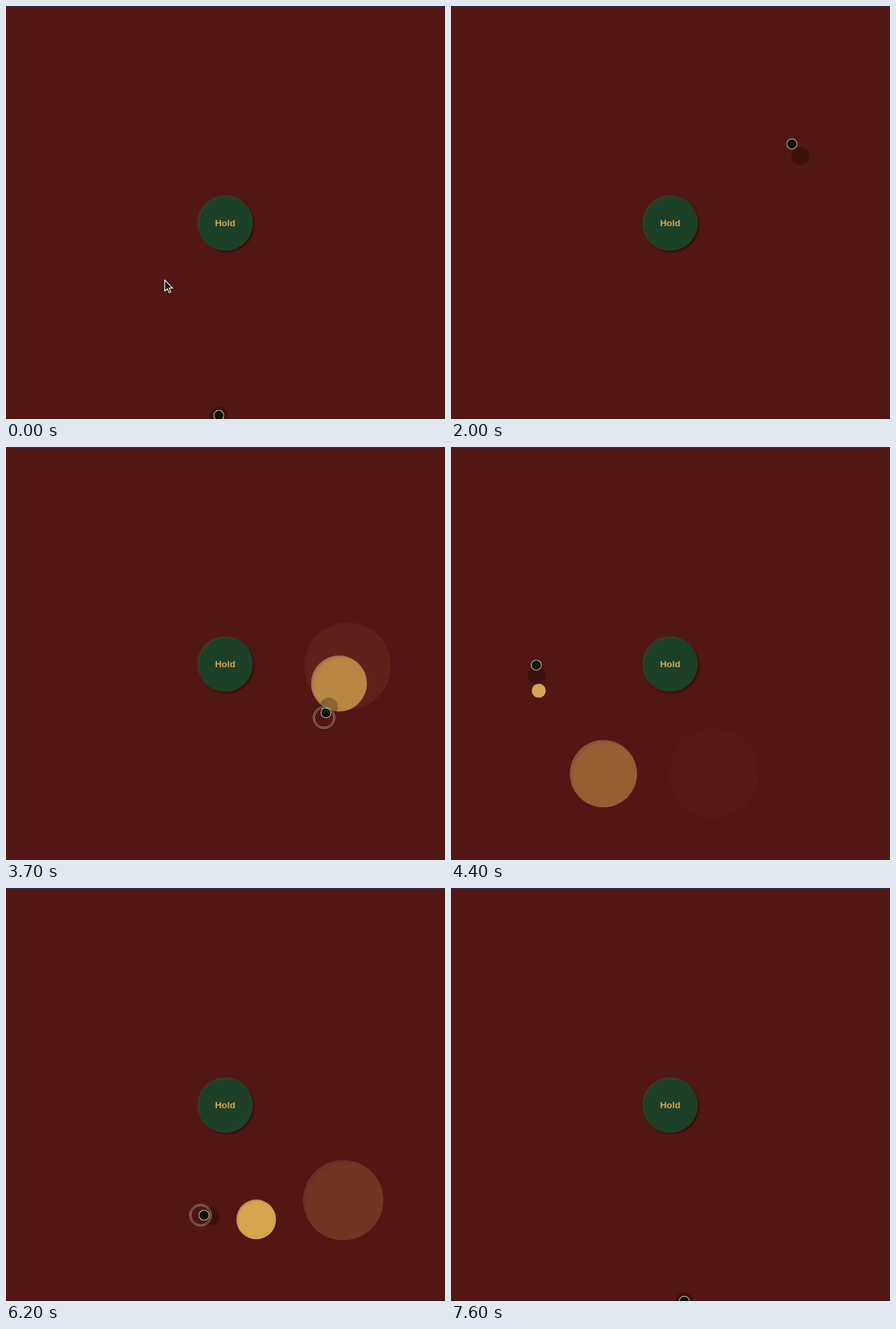
Animation, 640 px wide and 602 px high, one loop 9 s. Source, as an HTML page:

```html
<!DOCTYPE html>
<html lang="en">
<head>
<meta charset="utf-8">
<title>Hold</title>
<style>
html, body { margin: 0; width: 100%; height: 100%; overflow: hidden; background: #511715; }
#stage { position: relative; width: 640px; height: 602px; overflow: hidden; }
#stage > * { position: absolute; left: 0; top: 0; }
#bar { width: 640px; height: 2px; background: #30284a; }
#hold {
  left: 279px; top: 275.5px; width: 81px; height: 81px; border-radius: 50%;
  background: #1d4028; color: #d6a850; text-align: center;
  font: bold 13.33px/81px "Liberation Sans", Arial, sans-serif;
  box-shadow: 2px 2px 2px rgba(20, 22, 10, .7), inset 2px 2px 3px #553026;
}
.ripple {
  width: 132px; height: 132px; margin: -66px 0 0 -66px; border-radius: 50%;
  background: #d4a650; box-shadow: inset 4px 4px 4px rgba(180, 120, 135, .7);
}
#shade { width: 26px; height: 26px; margin: -13px 0 0 -13px; border-radius: 50%; background: rgba(0, 0, 0, .25); }
#dot {
  width: 13px; height: 13px; margin: -8px 0 0 -8px; padding: .5px; border-radius: 50%;
  border: 1px solid transparent;
  background: linear-gradient(#07110c, #07110c) content-box, linear-gradient(160deg, #d9a45c, #a9bd83) border-box;
  background-clip: content-box, border-box;
}
#dot { background: radial-gradient(circle, #07110c 6.4px, #c4a468 6.9px) border-box; }
#ring {
  width: 27px; height: 27px; margin: -16.5px 0 0 -16.5px; border-radius: 50%;
  border: 3px double #9a8c80;
}
</style>
</head>
<body>
<div id="stage">
  <div id="bar"></div>
  <div id="hold">Hold</div>
  <div id="shade"></div>
  <div id="dot"></div>
  <div id="ring"></div>
  <svg id="arrow" width="640" height="602">
    <path d="M231.5 399.5v16l3.7-3.4 2.5 5.6 2.5-1.1-2.5-5.4h4.9z" fill="#000" stroke="#fff" stroke-width="1.2"/>
  </svg>
</div>
<script>
const LOOP = 9000, STEP = 100;
const CENTRE = [320, 316];
const FIRST_CLICK = 2432, CLICK_GAP = 214, CLICKS = 21, LIFE = 520;
const LEAD = 16, LAG = 25;

// The follower circles the button: time, angle in degrees, distance
const keys = [
  [0, 92, 281], [250, 133, 122], [600, -12, 110], [720, -12, 110],
  [1180, -180, 95], [1480, -270, 255], [2000, -393, 211], [2415, -487, 197],
  [2626, -434, 168], [2900, -406, 201], [3268, -359, 178], [3700, -334, 163],
  [4330, -193, 196], [4980, -96, 188], [5200, -57, 198], [5836, 39, 221],
  [6050, 75, 173], [6200, 101, 164], [6440, 122, 221], [7400, 86, 287]
];
const last = keys.length - 1;
const el = id => document.getElementById(id);

// Flat at the ends and wherever the value holds or turns back
function slope(i, axis) {
  if (i === 0 || i === last) return 0;
  const [a, b, c] = keys.slice(i - 1, i + 2);
  if ((b[axis] - a[axis]) * (c[axis] - b[axis]) <= 0) return 0;
  return (c[axis] - a[axis]) / (c[0] - a[0]);
}

function at(t) {
  t = Math.max(0, Math.min(keys[last][0], t));
  let i = 0;
  while (keys[i + 1][0] < t) i++;
  const a = keys[i], b = keys[i + 1], h = b[0] - a[0], u = (t - a[0]) / h;
  const hermite = k =>
    a[k] * (1 + 2 * u) * (1 - u) ** 2 + b[k] * u * u * (3 - 2 * u) +
    h * u * (1 - u) * (slope(i, k) * (1 - u) - slope(i + 1, k) * u);
  const angle = hermite(1) * Math.PI / 180, r = hermite(2);
  return [CENTRE[0] + r * Math.cos(angle), CENTRE[1] + r * Math.sin(angle)];
}

function place(node, [x, y], scale = 1) {
  node.style.transform = `translate(${x}px, ${y}px) scale(${scale})`;
}

function show(node, visible) {
  node.style.display = visible ? "" : "none";
}

const ripples = Array.from({ length: CLICKS }, (_, i) => {
  const node = document.createElement("div"), start = FIRST_CLICK + i * CLICK_GAP;
  node.className = "ripple";
  el("stage").insertBefore(node, el("shade"));
  return { node, start, pos: at(start - 20) };
});

function draw(t) {
  for (const { node, start, pos } of ripples) {
    const u = (t - start) / LIFE, scale = 1 - (1 - u) ** 2;
    show(node, u > 0 && u < 1);
    node.style.opacity = Math.min(1, 2 * (1 - scale));
    place(node, pos, scale);
  }
  place(el("shade"), at(t - LAG));
  place(el("dot"), at(t));
  place(el("ring"), at(t + LEAD));
  show(el("ring"), ripples.some(({ start }) => start > t && start - t <= 100));
  show(el("arrow"), t < 100);
}

const begin = performance.now();
function tick() {
  const t = (performance.now() - begin) % LOOP;
  draw(Math.floor(t / STEP) * STEP);
  requestAnimationFrame(tick);
}
tick();
</script>
</body>
</html>
```
